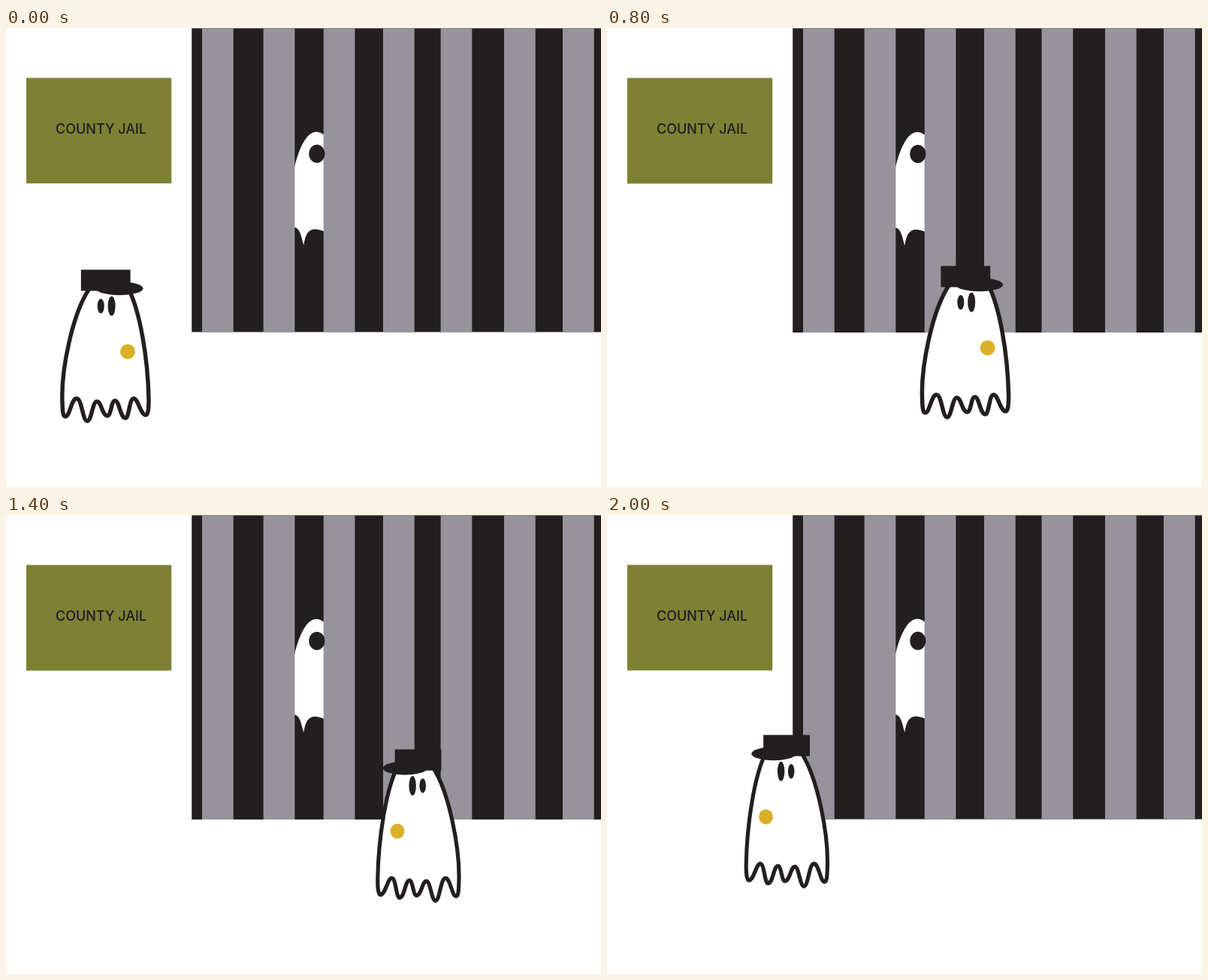
Write an HTML page that moves like this. It is 792 px wide and 612 px high and loops after 2.2 s.

```html
<!DOCTYPE html>
<html lang="en">
<head>
<meta charset="utf-8">
<title>County jail</title>
<style>
  html, body { margin: 0; width: 100%; height: 100%; overflow: hidden; background: #fff; }
  svg { display: block; width: 792px; height: 612px; }
  text { font: 500 18px Inter, Arial, sans-serif; }
</style>
</head>
<body>
<svg viewBox="0 0 792 612" fill="#231f20">
  <defs>
    <clipPath id="gap"><rect x="384.2" y="0" width="38.6" height="405"/></clipPath>
  </defs>

  <g id="scene">
    <rect x="27" y="66.5" width="193.2" height="140.7" fill="#7e8134"/>
    <text x="66" y="141" fill="#1f1d24">COUNTY JAIL</text>
    <rect x="247.2" y=".4" width="544.8" height="405"/>
    <g id="bars" fill="#97939a"></g>
    <path clip-path="url(#gap)" fill="#fff" d="M380 206 C386 168 398 138.5 413 138.5
      C419 138.5 424 142 430 150 L430 274 C417 268 410 267 405 270 C400 273 398 279 396.3 289.5
      C392 276 392 265 380 265 Z"/>
    <ellipse cx="413.8" cy="167.7" rx="10.6" ry="12.2"/>
  </g>

  <g id="guard">
    <path fill="#fff" stroke="#231f20" stroke-width="5.5" d="M112 346 C88 380 73 458 75 500
      C75.3 512 76 518 79 518 C85 518 87 494 94 494 C101 494 102 524 108 524
      C114 524 115 498 121 498 C127 498 128 517 135 517 C140 517 140 497 145 497
      C151 497 152 520 159 520 C164 520 164 494 170 494 C176 494 179 516 186 516
      C189 516 190 508 190 496 C189 440 178 375 162 346"/>
    <rect x="99.8" y="322.3" width="65.8" height="28.2"/>
    <ellipse cx="151" cy="347.3" rx="31.5" ry="8.9"/>
    <ellipse cx="126.2" cy="370.8" rx="4.6" ry="9.7"/>
    <ellipse cx="140.6" cy="370.8" rx="5" ry="13"/>
    <circle cx="162" cy="431.4" r="10" fill="#dab028"/>
  </g>
</svg>

<script>
const STEP = 200;
const BAR_WIDTH = 41.7;
const BARS = [261, 342.6, 422.7, 502, 578.6, 663, 741];

// Each pose: guard x, guard y, horizontal scale, downward drift of the jail's lower edge.
const RIGHT = 1, LEFT = -0.94;
const POSES = [
  [0, 0, RIGHT, 0],
  [62, -1, RIGHT, 0.3],
  [125.3, -2.2, RIGHT, 0.6],
  [235, -3.8, RIGHT, 0.3],
  [344.6, -5, RIGHT, 0.6],
  [496, -1, RIGHT, 0.6],
  [768.3, -8.8, LEFT, 0.2],
  [673.3, -9.8, LEFT, 0.6],
  [547, -17, LEFT, 0.6],
  [455, -19, LEFT, 0.3],
  [363.8, -29, LEFT, 0.2],
];

const byId = id => document.getElementById(id);
const scene = byId("scene"), guard = byId("guard");

byId("bars").innerHTML = BARS.map(x =>
  `<rect x="${x}" y=".4" width="${BAR_WIDTH}" height="405"/>`).join("");

const start = performance.now();

function draw() {
  const step = Math.floor((performance.now() - start) / STEP) % POSES.length;
  const [x, y, scaleX, drift] = POSES[step];
  guard.setAttribute("transform", `translate(${x} ${y}) scale(${scaleX} 1)`);
  scene.setAttribute("transform", `scale(1 ${1 + drift / 405})`);
  requestAnimationFrame(draw);
}
draw();
</script>
</body>
</html>
```
